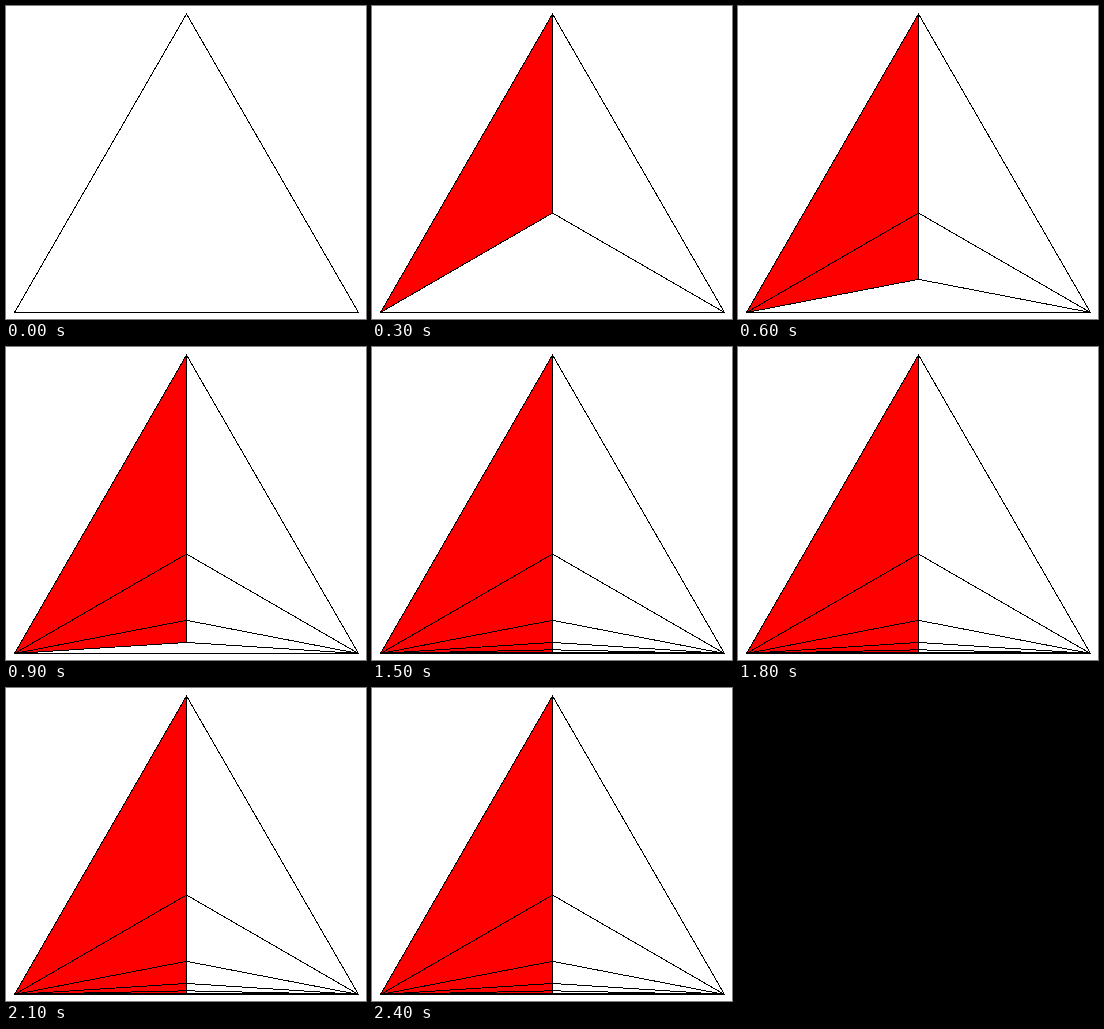
Animation, 360 px wide and 313 px high, one loop 3 s. Source, as an HTML page:

```html
<!DOCTYPE html>
<html lang="en">
<head>
<meta charset="utf-8">
<title>Triangle subdivision</title>
<style>
  html, body { margin: 0; width: 100%; height: 100%; overflow: hidden; background: #fff; }
  svg { display: block; width: 360px; height: 313px; }
  path { shape-rendering: crispEdges; }
  #lines { fill: none; stroke: #000; stroke-width: 1; }
  #area { fill: #f00; }
</style>
</head>
<body>
<svg viewBox="0 0 360 313">
  <path id="area"/>
  <path id="lines"/>
</svg>
<script>
(() => {
  const STEP = 300, LOOP = 3000, LAST = 8;
  const leftX = 8.5, rightX = 352.5, midX = 180.5, topY = 8, baseY = 306.5;
  const area = document.getElementById('area');
  const lines = document.getElementById('lines');

  // Each new point is the centroid of the triangle below the previous one.
  const apexY = n => baseY - (baseY - topY) / 3 ** n;
  const roof = y => `M${leftX} ${baseY}L${midX} ${y}L${rightX} ${baseY}`;

  function draw(step) {
    let d = roof(topY) + 'Z';
    for (let n = 1; n <= step; n++) d += roof(apexY(n));
    if (step) d += `M${midX} ${topY}V${apexY(step)}`;
    lines.setAttribute('d', d);
    area.setAttribute('d', step
      ? `M${leftX} ${baseY}L${midX} ${topY}V${apexY(step)}Z` : '');
  }

  const start = performance.now();
  let shown = -1;

  function tick() {
    const t = (performance.now() - start) % LOOP;
    const step = Math.min(LAST, Math.floor(t / STEP));
    if (step !== shown) draw(shown = step);
    requestAnimationFrame(tick);
  }
  tick();
})();
</script>
</body>
</html>
```
